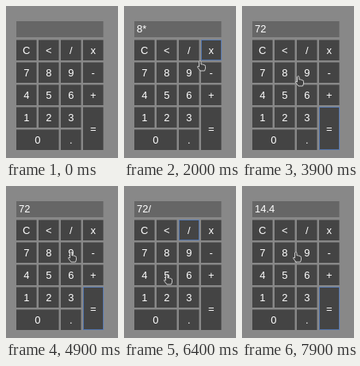
Animation of 141x190 px, one loop 8000 ms. Source, as an HTML page with a canvas:

```html
<!DOCTYPE html>
<html lang="en">
<head>
<meta charset="utf-8">
<title>Calculator</title>
<style>
  html, body { margin: 0; width: 100%; height: 100%; overflow: hidden; background: #888; }
  canvas { display: block; width: 100%; height: 100%; }
</style>
</head>
<body>
<canvas id="stage" width="141" height="190"></canvas>
<script>
const ctx = document.getElementById("stage").getContext("2d");
const LOOP = 8000, STEP = 100, TRAVEL = 600, PITCH = 28, SIZE = 25.5;

const keys = [
  ...["C</x", "789-", "456+", "123"].flatMap((line, row) =>
    [...line].map((label, col) => makeKey(label, col, row))),
  makeKey("0", 0, 4, 2, 1),
  makeKey(".", 2, 4),
  makeKey("=", 3, 3, 1, 2)
];

// The hand rests on a key (or midway between two) until the given time.
// With a third entry it presses the key and the display shows that text.
const steps = [
  [300, "=."],
  [1000, "8", "8"],
  [1800, "x", "8*"],
  [2200, "9", "8*9"],
  [2900, "=", "72"],
  [3400, "="],
  [4300, "89"],
  [4900, "9"],
  [5600, "/", "72/"],
  [6500, "5", "72/5"],
  [7100, "=", "14.4"],
  [7200, "="],
  [LOOP, "89"]
];

function makeKey(label, col, row, cols = 1, rows = 1) {
  return {
    label,
    x: 13 + col * PITCH,
    y: 42.5 + row * PITCH,
    w: SIZE + (cols - 1) * PITCH,
    h: SIZE + (rows - 1) * PITCH
  };
}

function box(x, y, w, h, color) {
  ctx.fillStyle = color;
  ctx.fillRect(x, y, w, h);
}

function text(str, x, y, align) {
  ctx.fillStyle = "#fff";
  ctx.textAlign = align;
  ctx.fillText(str, x, y);
}

function drawKey({ label, x, y, w, h }, focused) {
  box(x, y, w, h, "#444");
  if (focused) {
    ctx.strokeStyle = "rgba(85,135,215,0.7)";
    ctx.lineWidth = 1;
    ctx.strokeRect(x + 0.5, y, w - 0.5, h - 0.5);
  }
  text(label, x + w / 2, y + h / 2 + 4.7, "center");
}

// Middle of the named keys
function spot(labels) {
  const hit = keys.filter(k => labels.includes(k.label));
  const mean = f => hit.reduce((sum, k) => sum + f(k), 0) / hit.length;
  return [mean(k => k.x + k.w / 2), mean(k => k.y + k.h / 2 - 1)];
}

function cursorAt(t) {
  const i = steps.findIndex(s => s[0] > t);
  if (i < 1) return null;
  const [leave, from] = steps[i - 1], [until, to] = steps[i];
  const u = Math.min(1, (t - leave) / Math.min(TRAVEL, until - leave));
  const k = u * u * (3 - 2 * u);
  const a = spot(from), b = spot(to);
  return a.map((v, n) => v + (b[n] - v) * k);
}

const hand = new Path2D(
  "M-1.5 8V1.5Q0-0.5 1 1.5V5Q2.5 4.2 3.2 5.3Q4.5 4.6 5 6Q6.5 5.5 6.5 7.5V10" +
  "L5.5 13H0L-3.5 8.5Q-4 6.5-1.5 8Z"
);

function drawHand([x, y]) {
  ctx.save();
  ctx.translate(Math.round(x), Math.round(y));
  ctx.fillStyle = "#404040";
  ctx.fill(hand);
  ctx.strokeStyle = "#ddd";
  ctx.lineWidth = 0.9;
  ctx.lineJoin = "round";
  ctx.stroke(hand);
  ctx.restore();
}

function draw(now) {
  const t = Math.floor((now % LOOP) / STEP) * STEP;
  const [, focus, shown] =
    steps.filter(s => s[2] && s[0] <= t).pop() ?? [0, "", ""];
  box(0, 0, 141, 190, "#888");
  box(13, 19, 109.5, 20, "#666");
  ctx.font = "13px 'Liberation Sans', Arial, sans-serif";
  text(shown, 16, 33, "left");
  for (const key of keys) drawKey(key, key.label === focus);
  const tip = cursorAt(t);
  if (tip) drawHand(tip);
}

let start;
function tick(now) {
  start ??= now;
  draw(now - start);
  requestAnimationFrame(tick);
}
draw(0);
requestAnimationFrame(tick);
</script>
</body>
</html>
```
